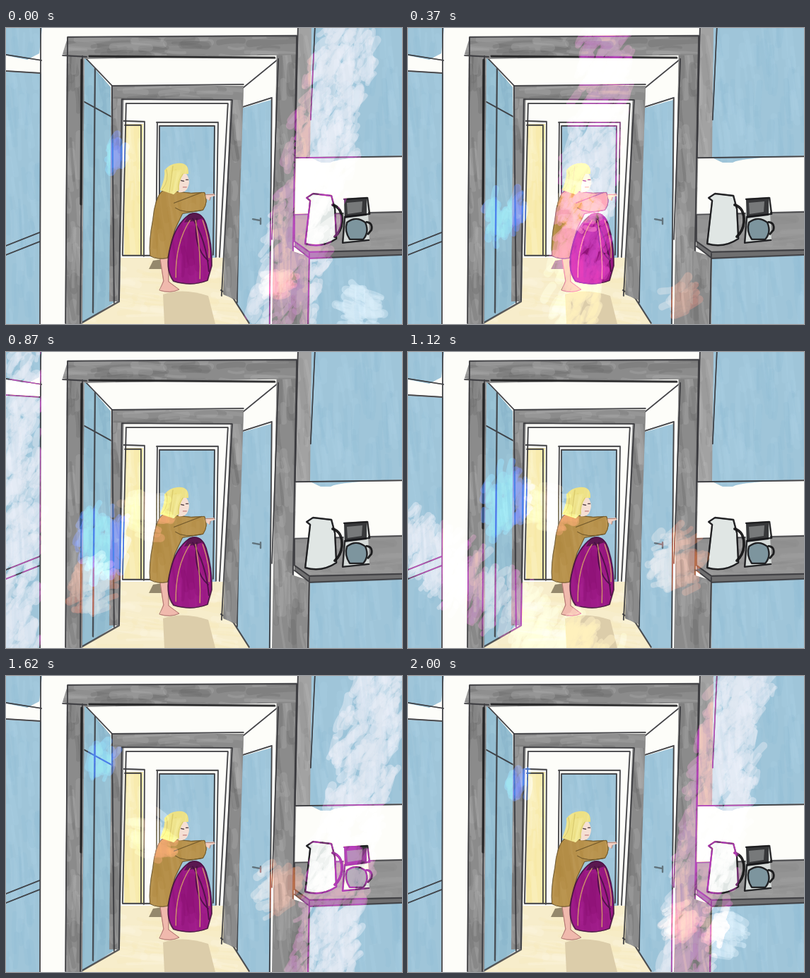
Write an HTML page with a canvas that moves like this. It is 560 px wide and 420 px high and loops after 2.12 s.

```html
<!DOCTYPE html>
<html lang="en">
<head>
<meta charset="utf-8">
<title>Hallway</title>
<style>
  html, body { margin: 0; width: 100%; height: 100%; overflow: hidden; background: #fdfdf9; }
  canvas { display: block; }
</style>
</head>
<body>
<canvas id="stage" width="560" height="420"></canvas>
<script>
const W = 560, H = 420, LOOP = 2120, STEPS = 17;
const stage = document.getElementById('stage').getContext('2d');
const layer = () => Object.assign(document.createElement('canvas'), { width: W, height: H }).getContext('2d');
const room = layer(), mask = layer();

let seed = 1;
const random = () => {
  seed = (seed * 16807) % 2147483647;
  return seed / 2147483647;
};
const spread = size => (random() * 2 - 1) * size;
const mix = (a, b, t) => a + (b - a) * t;

function dab(g, x, y, length, width, angle, color, alpha) {
  const dx = Math.cos(angle) * length / 2, dy = Math.sin(angle) * length / 2;
  g.globalAlpha = alpha;
  g.strokeStyle = color;
  g.lineWidth = width;
  g.lineCap = 'round';
  g.beginPath();
  g.moveTo(x - dx, y - dy);
  g.quadraticCurveTo(x + spread(4), y + spread(4), x + dx, y + dy);
  g.stroke();
  g.globalAlpha = 1;
}

// ---------- the room ----------
const BLUE = ['#9fc5d9', '#92bdd3', '#a9cee0'];
const GREY = ['#8b8b8b', '#696969', '#b0b0b0'];
const FLOOR = ['#f7edcb', '#f3e6b8', '#fbf6e2'];

function fill(path, color) {
  room.fillStyle = color;
  room.fill(new Path2D(path));
}

// Two loose passes of the pen.
function ink(path, width = 1.6, color = '#38393d') {
  room.strokeStyle = color;
  room.lineWidth = width;
  room.lineCap = room.lineJoin = 'round';
  room.globalAlpha = .75;
  for (let pass = 0; pass < 2; pass++) {
    room.save();
    room.translate(spread(.5), spread(.5));
    room.stroke(new Path2D(path));
    room.restore();
  }
  room.globalAlpha = 1;
}

// Flat colour with brush strokes inside; the path uses absolute M, L and Q only.
function wash(path, [color, ...shades], angle = 1.5) {
  const numbers = path.match(/\d+/g).map(Number);
  const xs = numbers.filter((_, i) => i % 2 === 0), ys = numbers.filter((_, i) => i % 2);
  const left = Math.min(...xs), top = Math.min(...ys);
  const width = Math.max(...xs) - left, height = Math.max(...ys) - top;
  fill(path, color);
  room.save();
  room.clip(new Path2D(path));
  for (let i = width * height / 300; i > 0; i--) {
    dab(room, left + random() * width, top + random() * height, 20 + random() * 50, 3 + random() * 8,
      angle + spread(.12), shades[random() * shades.length | 0], .3);
  }
  room.restore();
}

function paintHall() {
  fill('M0 0H560V420H0Z', '#fdfdf9');
  wash('M0 0L51 0L47 36L30 45L0 39Z', BLUE);
  wash('M0 62L50 65L47 420L0 420Z', BLUE);
  ink('M0 38L50 46M0 61L49 64M0 309L48 290M0 322L48 303M49 0L48 420');

  wash('M160 326L308 326L326 390L345 420L104 420L160 388Z', FLOOR, .1);
  fill('M222 378Q250 368 286 380L296 420H224Z', '#dccdaa');
  wash('M168 136L194 136L194 322L167 322Z', ['#f8ebae', '#f5e59a', '#fbf3cc']);
  wash('M217 139L296 139L296 326L216 326Z', BLUE);
  ink('M166 132L196 133L195 324M191 323V138H168M165 323H206M213 134H300L297 325M212 325L214 134M217 325V139H295L293 322');

  wash('M111 41L148 84L152 390L106 420Z', ['#96bfd2', '#86b0c6', '#a4cadb']);
  ink('M110 40L151 83M111 105L149 126M126 57L123 404M106 419L160 388');
  wash('M333 114L375 102L374 420L345 420L326 392Z', BLUE);
  ink('M383 46L333 87M327 390L332 113L376 99L373 420M318 378L344 419M304 372L322 384');
  ink('M349 271L360 273M360 270V278', 2.2, '#5d6d75');

  // inner and outer frames
  wash('M149 82L167 82L161 388L146 388Z', GREY);
  wash('M318 84L336 86L326 386L307 378Z', GREY);
  wash('M149 82L336 82L334 102L150 100Z', GREY, 0);
  ink('M153 390L150 82L336 80M160 387L164 101L320 102L305 380M165 322L170 107H314L302 325');
  wash('M86 13L111 14L108 420L84 420Z', GREY);
  wash('M383 16L413 15Q411 200 404 420L376 420Z', GREY);
  wash('M80 37L87 14L413 11L412 38L114 44Z', GREY, 0);
  ink('M84 419L87 13L411 11L404 419M80 39L114 41M105 419L108 40M385 44L376 300');
  ink('M118 40L380 42M107 45L106 250', 2.6, '#202022');
}

function paintKitchen() {
  wash('M413 0L434 0L431 185L410 185Z', ['#a2a2a2', '#8d8d8d', '#bbbbbb']);
  wash('M432 0L560 0L560 181Q470 184 459 191L445 191L430 184Z', BLUE);
  ink('M437 0L431 130M410 184L560 182M413 0L409 184');

  wash('M404 316L431 325L431 420L402 420Z', GREY);
  wash('M430 325L560 322L560 420L429 420Z', BLUE);
  wash('M408 266L560 261L560 317L428 321L408 302Z', ['#949494', '#898989', '#a3a3a3'], 0);
  fill('M408 302L429 317L560 314V322L430 327L408 310Z', '#6f6f70');
  ink('M560 261L408 265V303L429 318L560 315M408 310L430 327L560 322M429 320L427 420');

  // kettle
  const kettle = 'M425 241L434 235L460 238L465 257L467 299Q446 313 423 306L430 245Z';
  fill(kettle, '#e0e6e4');
  ink(kettle, 2.2, '#151517');
  ink('M462 251Q476 255 475 275Q474 288 465 296', 3.5, '#151517');

  // coffee maker
  fill('M478 243L511 241L514 301L477 306Z', '#d6dbd9');
  fill('M478 243L510 241V266L479 270Z', '#37383a');
  fill('M482 248L504 246L503 261L483 264Z', '#77797a');
  fill('M482 276Q495 266 508 276Q514 290 505 300H486Q478 288 482 276Z', '#7d959e');
  ink('M478 243L511 241L514 264L479 268L476 305L513 301M482 276Q495 266 508 276Q514 290 505 300H486Q478 288 482 276', 2, '#151517');
  ink('M510 275Q519 276 517 286L512 292', 2.6, '#151517');
}

function paintGirl() {
  fill('M202 342L208 330L222 328V342Z', '#94886c');
  fill('M217 322H230L230 359L245 371Q235 377 218 373L222 358Z', '#f0b9ad');
  ink('M218 327L223 359L217 372Q232 377 245 371L230 360V330', .8, '#a76d68');

  const coat = 'M221 231Q211 240 208 272Q202 303 204 323Q215 329 229 326L239 286L250 263L279 258Q287 246 281 233L262 234L244 232Z';
  wash(coat, ['#b6904a', '#ab843c', '#c09b5a']);
  ink(coat + 'M277 233L238 248M240 255Q252 264 278 258', 1, '#6f572b');
  fill('M282 236L294 235L296 238L289 240L288 245L283 242Z', '#f3cfc1');
  ink('M282 236L295 236M288 244L289 240', .7, '#9a6d63');

  fill('M238 202Q258 200 259 219Q257 235 244 233Z', '#f5dfd3');
  wash('M242 192Q259 190 258 207L251 207Q244 218 245 229L237 236L218 230Q226 211 224 202Q231 193 242 192Z',
    ['#ede184', '#f4eda6', '#ddce68'], 1.8);
  ink('M227 201Q231 216 221 229M236 196Q233 218 231 233M250 207Q242 218 244 231', .6, '#cbb95c');
  ink('M248 216L252 217M255 215L258 215', 1.2, '#4d3d40');
  ink('M250 226L255 226', .8, '#b9686a');

  const bag = 'M260 264Q276 258 283 278Q292 307 291 337L285 358Q262 367 237 359Q224 342 233 308Q240 278 260 264Z';
  wash(bag, ['#9b1a85', '#87106f', '#a92293']);
  fill('M258 265Q270 259 278 270L266 274L252 276Z', '#5a1850');
  ink(bag + 'M264 270Q283 300 287 345M270 270Q264 310 286 330', 1.3, '#43123e');
  ink('M260 273Q239 305 240 354M268 273Q276 322 274 356M278 273Q289 305 287 326', 1, '#d9a868');
}

// ---------- travelling light ----------
const wave = (step, peak) => Math.cos(2 * Math.PI * (step - peak) / STEPS);

// A band crosses to the left, then swings along the floor back to the right.
function bandAt(step) {
  if (step <= 7) {
    const t = step / 7;
    return { x: mix(437, 20, t), y: 210, angle: mix(.23, 0, t), length: 430, radius: mix(47, 30, t) };
  }
  const angle = mix(Math.PI, .2, Math.min(1, (step - 7) / 6));
  return {
    x: 250 + 235 * Math.cos(angle) - 18 * Math.max(0, step - 13),
    y: 210 + 165 * Math.sin(angle), angle, length: 560, radius: 46,
  };
}

// "lift" brightens the paint, "tint" recolours what is dark.
const lights = [
  { lift: '#4a261a', tint: '#b83ebc', tilt: 2.1, at: bandAt },
  { lift: '#0a2820', tint: '#4a86ee', tilt: 1.9, at: step => ({
    x: 138 + 190 * Math.cos(Math.PI * (step - 5) / 6) ** 16,
    y: 205 + 85 * wave(step, 5), radius: 26 + 12 * wave(step, 7) }) },
  { lift: '#482414', tint: '#b87048', tilt: 2.6, at: step => ({
    x: 385 - 270 * Math.exp(-(((step - 6.2) / 2) ** 4)),
    y: 335 + 50 * wave(step, 2.5), radius: 27 + 9 * wave(step, 10) }) },
  { lift: '#40281e', tint: '#8e8870', tilt: .3, at: step => {
    const swing = Math.cos(Math.PI * step / STEPS) ** 12;
    return { x: 200 + 300 * swing, y: 225 + 170 * swing, radius: 27 };
  } },
];

function glaze(mode, color) {
  mask.globalCompositeOperation = 'source-in';
  mask.fillStyle = color;
  mask.fillRect(0, 0, W, H);
  mask.globalCompositeOperation = 'source-over';
  stage.globalCompositeOperation = mode;
  stage.drawImage(mask.canvas, 0, 0);
  stage.globalCompositeOperation = 'source-over';
}

function shine({ lift, tint, tilt, at }, step) {
  const { x, y, radius, angle = 0, length = radius } = at(step);
  mask.clearRect(0, 0, W, H);
  for (let i = (length + 2 * radius) * radius / 45; i > 0; i--) {
    const along = spread(length / 2), turn = random() * 2 * Math.PI, reach = Math.sqrt(random()) * radius;
    dab(mask, x - Math.sin(angle) * along + Math.cos(turn) * reach,
      y + Math.cos(angle) * along + Math.sin(turn) * reach,
      10 + random() * 16, 5 + random() * 8, tilt + spread(.4), '#fff', .5);
  }
  glaze('color-dodge', lift);
  glaze('lighten', tint);
}

function draw(step) {
  stage.drawImage(room.canvas, 0, 0);
  seed = 977 + step * 7919;
  for (const item of lights) shine(item, step);
}

// Steps last 120 and 130 ms in turn.
let shown = -1;
function tick() {
  const hundredths = Math.floor(performance.now() % LOOP / 10);
  const step = Math.min(STEPS - 1, Math.floor((hundredths + .5) / 12.5));
  if (step !== shown) draw(shown = step);
  requestAnimationFrame(tick);
}

paintHall();
paintKitchen();
paintGirl();
tick();
</script>
</body>
</html>
```
